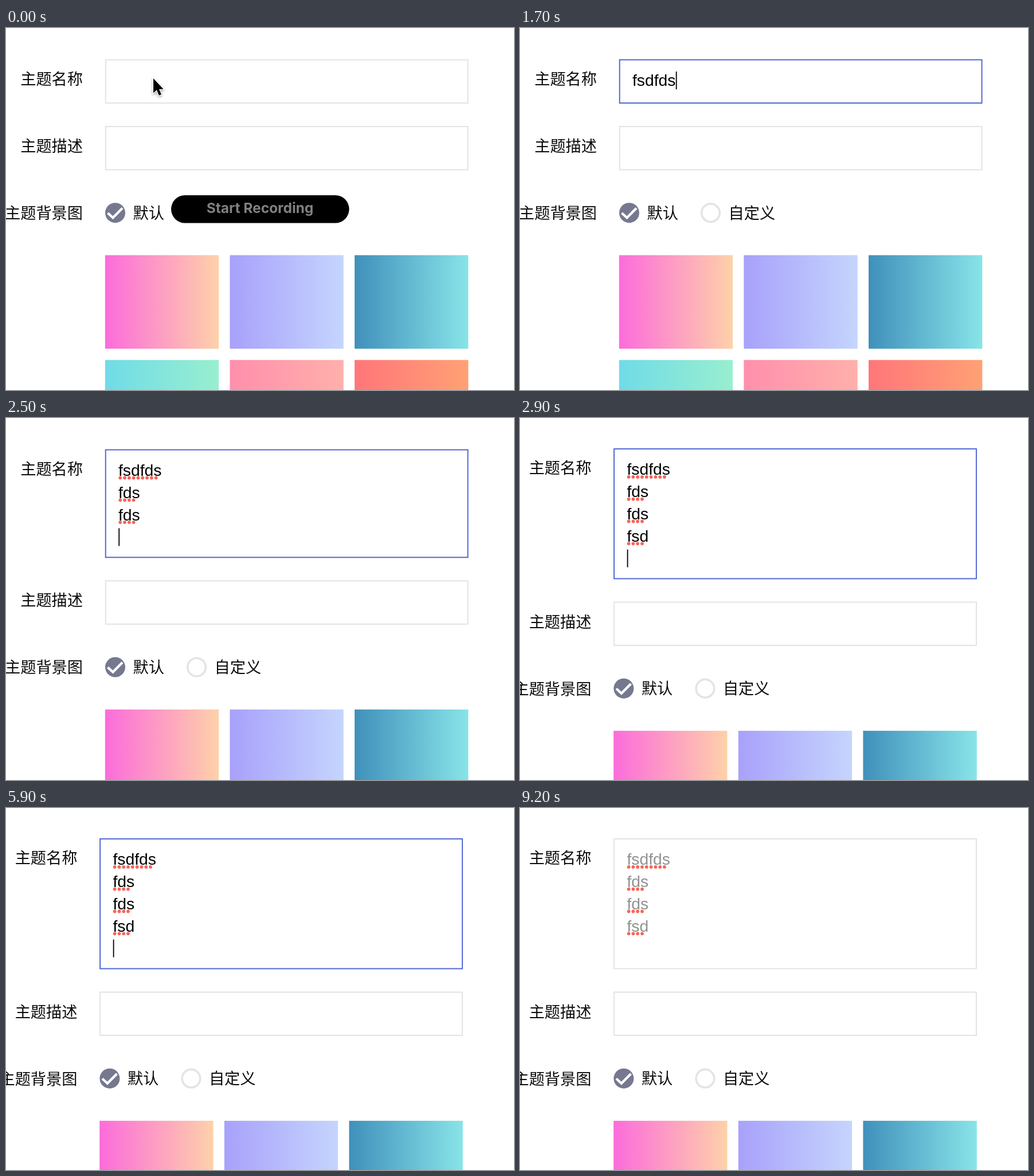
Write an HTML page that moves like this. It is 886 px wide and 632 px high and loops after 9700 ms.

```html
<!DOCTYPE html>
<html lang="zh">
<head>
<meta charset="utf-8">
<title>主题</title>
<style>
  html, body { margin: 0; width: 100%; height: 100%; overflow: hidden; background: #fff; }
  svg { display: block; width: 886px; height: 632px; }
  .cjk { font: 27.2px "Noto Sans CJK SC", "Noto Sans CJK", sans-serif; fill: #0b0b0c; }
  .end { text-anchor: end; }
  .typed { font: 28.3px "Liberation Sans", sans-serif; }
  .toast { font: 700 24.5px Inter, sans-serif; fill: #808084; text-anchor: middle; }
  .box { fill: #fff; stroke: #e3e3e4; stroke-width: 2; }
</style>
</head>
<body>
<svg viewBox="0 0 886 632">
  <defs id="defs"></defs>
  <g id="page">
    <text class="cjk end" x="134" y="99">主题名称</text>
    <rect id="field" class="box" x="173.700" y="55.500" width="631.800" height="75.500"/>
    <g id="lines"></g>
    <rect id="caret" width="1.8" height="31"/>
    <g id="below">
      <text class="cjk end" x="134" y="216">主题描述</text>
      <rect class="box" x="173.700" y="172" width="631.800" height="75.500"/>
      <text class="cjk end" x="134" y="333">主题背景图</text>
      <circle cx="190.500" cy="322.700" r="17.500" fill="#76788f"/>
      <path d="M177.500 323L186.500 331.300L203 314.500" fill="none" stroke="#fff" stroke-width="4.300"/>
      <text class="cjk" x="221.500" y="332.700">默认</text>
      <circle cx="332.500" cy="322.700" r="15.800" fill="#fff" stroke="#e4e4e4" stroke-width="3.600"/>
      <text class="cjk" x="363.500" y="332.700">自定义</text>
      <g id="tiles"></g>
    </g>
  </g>
  <g id="toast">
    <rect x="288" y="292" width="310.500" height="48.500" rx="24.200"/>
    <text class="toast" x="443" y="323">Start Recording</text>
  </g>
  <path id="arrow" d="M0 0V25.500L5.800 20.300L9.800 29.800L14 28L10 18.700H17.600Z"
        stroke="#fff" stroke-width="2.400" paint-order="stroke"
        style="filter:drop-shadow(0 2px 2px rgba(0,0,0,.35))"/>
  <path id="beam" d="M-5 -16Q0 -16 0 -12V12Q0 16 -5 16M5 -16Q0 -16 0 -12M0 12Q0 16 5 16"
        fill="none" stroke="#222" stroke-width="2"/>
</svg>
<script>
const LOOP = 9700, STEP = 100, PITCH = 38.8;
const BLUE = [80, 104, 214], GREY = [227, 227, 228], BLACK = [0, 0, 0], DIM = [146, 146, 146];
const $ = id => document.getElementById(id);

function add(parent, tag, attrs, text = '') {
  const el = document.createElementNS('http://www.w3.org/2000/svg', tag);
  for (const key in attrs) el.setAttribute(key, attrs[key]);
  el.textContent = text;
  parent.append(el);
  return el;
}

const gradients = [
  ['#fc6cdb', '#fed1a9'], ['#a8a1fb', '#c5d5fd'], ['#4090bb', '#88e4e8'],
  ['#70dbe7', '#98efcf'], ['#ff8fac', '#ffb0ab'], ['#ff7679', '#ffa174']
];
gradients.forEach((stops, i) => {
  const gradient = add($('defs'), 'linearGradient', { id: 'g' + i });
  stops.forEach((color, offset) => add(gradient, 'stop', { offset, 'stop-color': color }));
  add($('tiles'), 'rect', {
    x: 172.8 + 217.6 * (i % 3), y: 396.6 + 183 * Math.floor(i / 3),
    width: 198.3, height: 163.3, fill: `url(#g${i})`
  });
});

// Each entry appends text at its time.
const typing = [
  [1200, 'f'], [1300, 's'], [1400, 'd'], [1500, 'f'], [1600, 'd'], [1700, 's'],
  [1800, '\n'], [2000, 'fds'], [2100, '\n'], [2200, 'f'], [2300, 'd'], [2400, 's'],
  [2500, '\n'], [2700, 'fs'], [2800, 'd'], [2900, '\n']
];

// time, cursor, x, y
const pointer = [
  [0, 'arrow', 257, 88], [400, 'beam', 290, 115], [500, 'beam', 300, 90],
  [600, 'beam', 270, 75], [700, 'beam', 240, 92], [1200, '', 0, 0],
  [3600, 'beam', 250, 92], [3700, 'beam', 315, 86], [3800, 'beam', 385, 74],
  [3900, 'arrow', 448, 38], [4000, 'arrow', 486, 22], [4100, '', 0, 0]
];

const rows = Array.from({ length: 5 }, (_, i) => {
  const y = 101 + i * PITCH;
  const text = add($('lines'), 'text', { class: 'typed', x: 196, y });
  const dots = add($('lines'), 'g', { fill: '#f9645a' });
  const count = i ? 4 : 9;
  for (let k = 0; k < count; k++)
    add(dots, 'circle', { cx: 199.2 + 7.8 * k, cy: y + 3.5, r: 2.9 });
  return { text, dots };
});

const show = (el, on) => el.setAttribute('visibility', on ? 'visible' : 'hidden');
const move = (el, x, y) => el.setAttribute('transform', `translate(${x} ${y})`);
const fade = (t, start) => Math.max(0, Math.min(1, (t - start + STEP) / 300));
const mix = (a, b, k) => `rgb(${a.map((v, i) => Math.round(v + (b[i] - v) * k))})`;

function draw(t) {
  const blur = fade(t, 6800);
  const content = typing.filter(([at]) => at <= t).map(([, s]) => s).join('').split('\n');
  const last = content.length - 1;
  const height = Math.max(77.5, 34.6 + PITCH * content.length);

  rows.forEach(({ text, dots }, i) => {
    text.textContent = content[i] || '';
    text.setAttribute('fill', mix(BLACK, DIM, blur));
    show(dots, i < last && t >= 2000);
  });

  $('field').setAttribute('height', height - 2);
  $('field').style.stroke = mix(GREY, BLUE, fade(t, 900) - blur);
  move($('below'), 0, height - 77.5);
  move($('page'), t >= 2900 ? -9.6 : 0, t >= 2900 ? -1.6 : 0);

  const width = content[last] ? rows[last].text.getComputedTextLength() : 0;
  $('caret').setAttribute('x', 196.3 + width);
  $('caret').setAttribute('y', 76 + last * PITCH);
  const blinkOff = t >= 3400 && Math.floor((t - 3400) / 500) % 2 === 0;
  show($('caret'), t >= 900 && t < 6800 && !blinkOff);

  show($('toast'), t < 100);
  const [, kind, x, y] = pointer.findLast(([at]) => at <= t);
  for (const id of ['arrow', 'beam']) {
    show($(id), id === kind);
    move($(id), x, y);
  }
}

const start = performance.now();
function tick() {
  const t = (performance.now() - start) % LOOP;
  draw(Math.floor(t / STEP) * STEP);
  requestAnimationFrame(tick);
}
tick();
</script>
</body>
</html>
```
